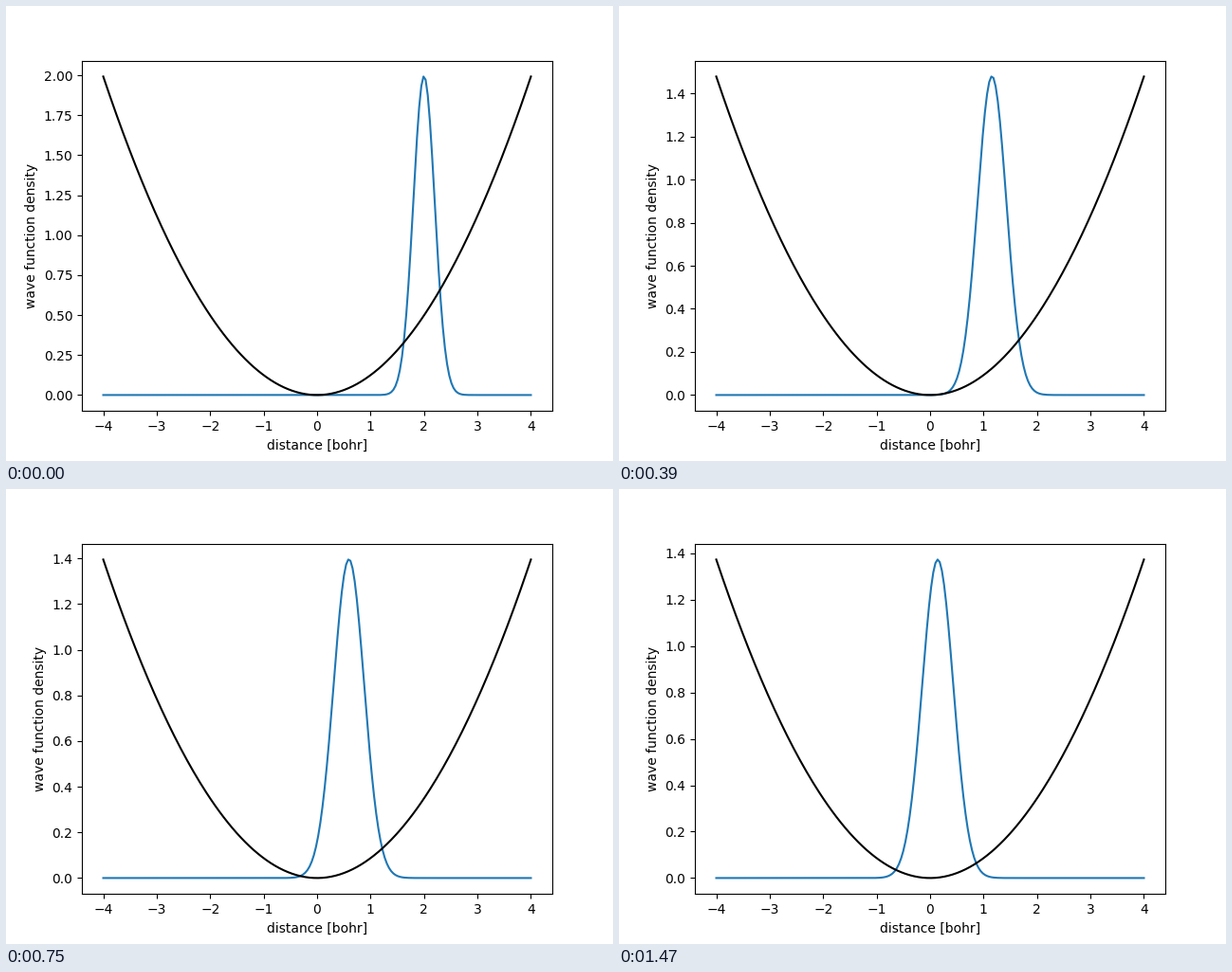
These frames come from a looping animation (640x480 px, 1.5 s). A matplotlib script:

```python
import numpy as np
import matplotlib.pyplot as plt
from matplotlib.animation import FuncAnimation

FRAMES = 50
INTERVAL = 30            # ms
X = np.linspace(-4, 4, 200)
START = 2.0              # initial centre of the packet
VAR_START = 0.04         # initial variance of the density
VAR_GROUND = 0.5 / np.sqrt(35)   # variance of the ground state
RATE = 0.06              # imaginary-time phase per frame
PHASE = np.arctanh(VAR_START / VAR_GROUND)

plt.rcParams["font.family"] = "DejaVu Sans"
fig, ax = plt.subplots(figsize=(6.4, 4.8), dpi=100)


def density(step):
    """Gaussian packet relaxing in a harmonic well in imaginary time."""
    phase = PHASE + RATE * step
    centre = START * np.cosh(PHASE) / np.cosh(phase)
    var = VAR_GROUND * np.tanh(phase)
    return np.exp(-(X - centre) ** 2 / (2 * var)) / np.sqrt(2 * np.pi * var)


def draw(step):
    ax.clear()
    rho = density(step)
    well = X ** 2 / 16 * rho.max()
    ax.plot(X, rho, color="C0")
    ax.plot(X, well, color="black")
    ax.set_xlabel("distance [bohr]")
    ax.set_ylabel("wave function density")
    return ax.lines


anim = FuncAnimation(fig, draw, frames=FRAMES, init_func=lambda: draw(0),
                     interval=INTERVAL, repeat=True, repeat_delay=0)
plt.show()
```
